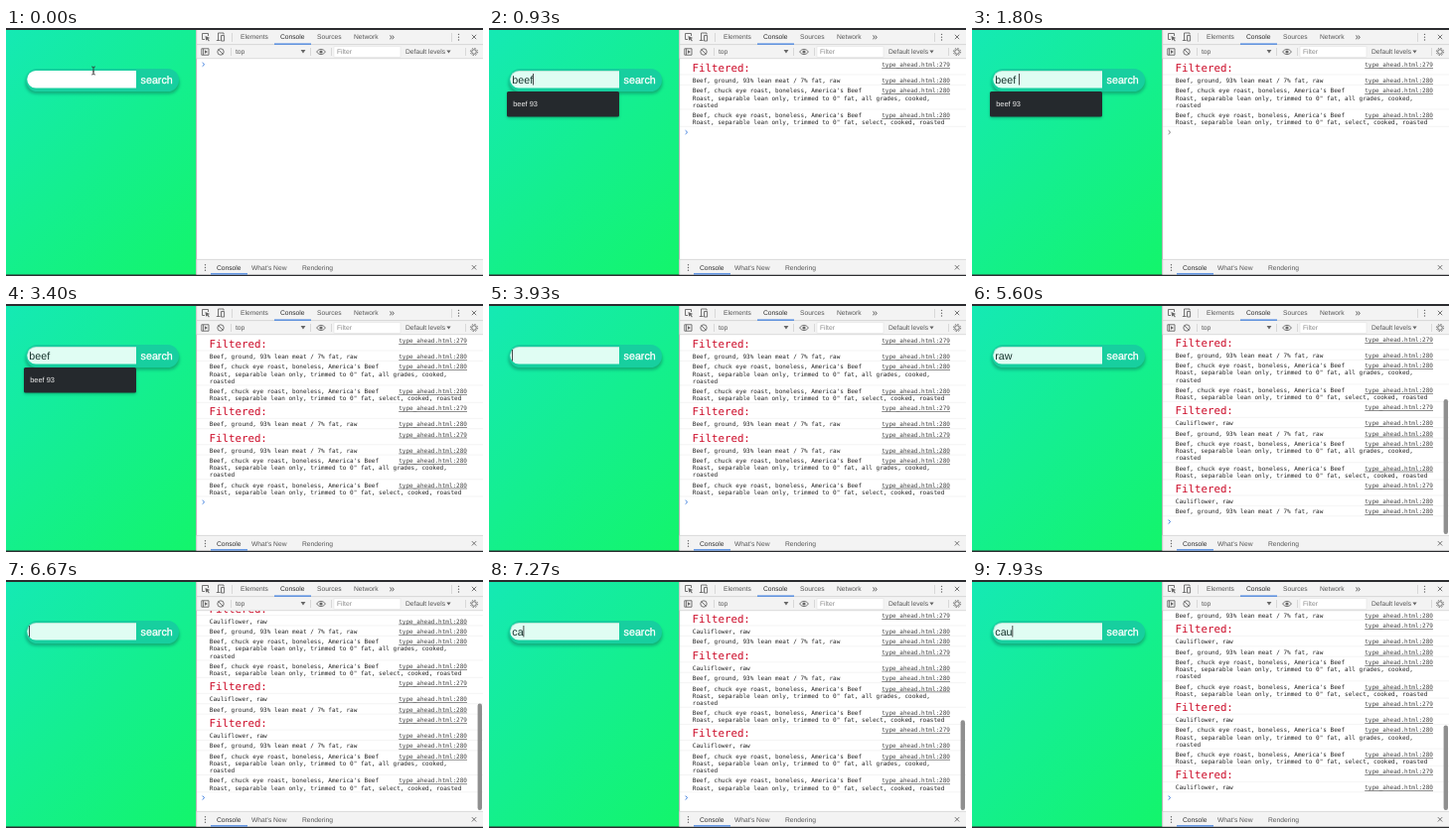
Write an HTML page that moves like this. It is 480 by 250 pixels and loops after 8000 ms.

```html
<!DOCTYPE html>
<html lang="en">
<head>
<meta charset="utf-8">
<title>Type ahead search</title>
<style>
  html, body { margin: 0; width: 100%; height: 100%; overflow: hidden; background: #2b2c2f; }
  svg { display: block; width: 480px; height: 250px; }
  text { text-rendering: geometricPrecision; white-space: pre; }
  .ui { font: 6.7px "Liberation Sans", Arial, sans-serif; fill: #555; }
  .ui .on { fill: #2a2a2a; }
  .mono { font: 6.03px "DejaVu Sans Mono", Menlo, monospace; fill: #222; }
  .link { text-decoration: underline; text-anchor: end; fill: #444; }
  .head { font-size: 10.75px; fill: #cc0a27; }
  .field { font: 10.7px "Liberation Sans", Arial, sans-serif; fill: #17332d; }
  .icon { fill: none; stroke: #666; stroke-width: .9; }
  .rule { fill: none; stroke: #ccc; stroke-width: .7; }
  .solid { fill: #666; }
</style>
</head>
<body>
<svg viewBox="0 0 480 250">
  <defs>
    <linearGradient id="bg" gradientUnits="userSpaceOnUse" x1="-14" y1="16" x2="205" y2="234">
      <stop offset="0" stop-color="#15e9b4"/>
      <stop offset="1" stop-color="#13f56b"/>
    </linearGradient>
    <filter id="soft" x="-20%" y="-60%" width="140%" height="240%">
      <feGaussianBlur stdDeviation="1.5"/>
    </filter>
    <clipPath id="view"><rect x="192" y="31" width="288" height="202"/></clipPath>
  </defs>

  <rect width="480" height="250" fill="#2b2c2f"/>
  <rect y="2" width="191" height="246.5" fill="url(#bg)"/>

  <!-- search box -->
  <rect x="19.5" y="44.5" width="155" height="22" rx="11" fill="#0a7f62" opacity=".55" filter="url(#soft)"/>
  <rect x="20" y="41" width="154" height="23" rx="11.5" fill="#17cf9f"/>
  <path id="box" d="M131 43H30a8.75 8.75 0 0 0 0 17.5H131z" fill="#fff"/>
  <path id="inset" d="M131 43.4H30a8.4 8.4 0 0 0-8.2 7" fill="none" stroke="#0a7f62" stroke-opacity=".25" stroke-width=".8"/>
  <text class="field" x="135.6" y="55.6" style="fill:#fff;stroke:#fff;stroke-width:.3">search</text>
  <text class="field" id="typed" x="23.3" y="55.6"></text>
  <rect id="caret" y="46" width=".8" height="11.5" fill="#222"/>
  <g id="menu">
    <rect x="18" y="65" width="113" height="26" rx="2" fill="#064" opacity=".4" filter="url(#soft)"/>
    <rect x="18" y="64" width="113" height="25.5" rx="1.5" fill="#25292d"/>
    <text x="24.2" y="79.4" style="font:7.4px 'Liberation Sans',Arial,sans-serif;fill:#f0f0f0">beef 93</text>
  </g>
  <path id="mouse" d="M-1.8-4Q0-4 0-2.8Q0-4 1.8-4M0-2.8V2.8M-1.8 4Q0 4 0 2.8Q0 4 1.8 4M-.9 1H.9" fill="none" stroke="#333" stroke-width=".9"/>

  <!-- console panel -->
  <rect x="191.5" y="2" width="288.5" height="246.5" fill="#fff"/>
  <g clip-path="url(#view)">
    <g id="log" class="mono"></g>
    <rect id="thumb" x="474.6" width="4.4" rx="2.2" fill="#8f8f8f"/>
  </g>

  <g class="ui">
    <path d="M191.5 2H480V30.5H191.5zM191.5 233.5H480V248.5H191.5z" fill="#f3f3f3"/>
    <path class="rule" d="M191.5 16.6H480M191.5 30.7H480M191.5 233.4H480M191.7 2V248.5M227.5 5V14M226.5 20V28M306.5 20V28M327.5 20V28M448.5 5V14M462.5 20V28"/>
    <path d="M270 16.1H307M206 247.9H243" stroke="#3b7de0" stroke-width="1.1"/>
    <rect x="330" y="18.8" width="67" height="10.4" fill="#fff" stroke="#ddd" stroke-width=".5"/>

    <text x="236" y="11.4">Elements</text>
    <text x="276" y="11.4" class="on">Console</text>
    <text x="313" y="11.4">Sources</text>
    <text x="350" y="11.4">Network</text>
    <text x="385.5" y="11.8" font-size="10">»</text>
    <text x="231" y="26.2">top</text>
    <text x="333" y="26.2" fill="#888">Filter</text>
    <text x="402" y="26.2">Default levels</text>
    <text x="212" y="243.6" class="on">Console</text>
    <text x="247" y="243.6">What's New</text>
    <text x="298" y="243.6">Rendering</text>

    <path class="icon" d="M203.5 8V5.5H197.5V11.5H200M213.5 12.5V5H219V6.5M216.5 7.5H219.6V13H216.5zM211.8 12.5H215.5"/>
    <path class="solid" d="M200.5 8L205.2 10L203.3 10.8L204.8 12.8L204 13.4L202.5 11.4L201.2 12.8z"/>
    <path class="icon" d="M196.8 20.8H204V27.2H196.8zM198.6 20.8V27.2"/>
    <path class="solid" d="M200 22.2L203 24L200 25.8zM296.6 22H301.4L299 25.6zM443.4 22.4H447.6L445.5 25.6z"/>
    <circle class="icon" cx="216" cy="24" r="3.2"/>
    <path class="icon" d="M213.8 21.8L218.2 26.2"/>
    <path class="icon" d="M312.5 24Q317 18.6 321.5 24Q317 29.4 312.5 24z"/>
    <circle class="solid" cx="317" cy="24" r="1.6"/>
    <circle class="icon" cx="471" cy="24" r="2.3" stroke-width="1.5"/>
    <circle class="icon" cx="471" cy="24" r="3.6" stroke-dasharray="1.4 1.427"/>
    <path class="icon" d="M468.8 6.8L473.2 11.2M473.2 6.8L468.8 11.2M468.8 239.1L473.2 243.5M473.2 239.1L468.8 243.5"/>
    <path d="M455.5 6V12.4M200.5 238.3V244.7" stroke="#666" stroke-width="1.4" stroke-linecap="round" stroke-dasharray="0 2.8" transform="translate(0 .4)"/>
  </g>
</svg>

<script>
const LOOP = 8000;
const TOP = 31, VIEW = 202, PROMPT_H = 19.2;
const $ = id => document.getElementById(id);

const chuck = "Beef, chuck eye roast, boneless, America's Beef";
const cut = 'Roast, separable lean only, trimmed to 0" fat, ';
const foods = {
  c: ["Cauliflower, raw"],
  g: ["Beef, ground, 93% lean meat / 7% fat, raw"],
  a: [chuck, cut + "all grades, cooked,", "roasted"],
  s: [chuck, cut + "select, cooked, roasted"]
};
const rowHeight = [0, 10.4, 17.3, 24.6];

// time and the foods that matched
const results = [
  [800, "gas"], [2330, "g"], [3130, "gas"], [4000, "cgas"],
  [5130, "cg"], [5730, "cgas"], [7070, "cas"], [7670, "c"]
];
// time and the text in the field
const keys = [
  [330, ""], [730, "b"], [800, "be"], [870, "bee"], [930, "beef"],
  [1800, "beef "], [2270, "beef 9"], [2670, "beef 93"], [2800, "beef 9"], [2870, "beef "],
  [3470, "bee"], [3530, "be"], [3600, "b"], [3670, ""],
  [4670, "r"], [4870, "ra"], [5070, "raw"], [5730, "ra"], [5930, "r"], [6200, ""],
  [7000, "c"], [7200, "ca"], [7600, "cau"]
];

function add(parent, tag, attrs, content = "") {
  const el = document.createElementNS("http://www.w3.org/2000/svg", tag);
  for (const name in attrs) el.setAttribute(name, attrs[name]);
  el.textContent = content;
  return parent.appendChild(el);
}

function addRow(group, y, height, line) {
  add(group, "text", { x: 464, y: y + 8, class: "link" }, "type_ahead.html:" + line);
  add(group, "path", { d: `M192 ${y + height}H480`, stroke: "#ececec", "stroke-width": .6 });
}

const log = $("log");
let end = TOP;
const ends = [end];
const groups = results.map(([, found]) => {
  const group = add(log, "g", {});
  add(group, "text", { x: 204.6, y: end + 13, class: "head" }, "Filtered:");
  addRow(group, end, 16, 279);
  end += 16;
  for (const id of found) {
    const lines = foods[id], height = rowHeight[lines.length];
    lines.forEach((s, i) => add(group, "text", { x: 204.8, y: end + 8 + i * 7.1 }, s));
    addRow(group, end, height, 280);
    end += height;
  }
  ends.push(end);
  return group;
});
const prompt = add(log, "path", { d: "M197.6 3.9L199.6 5.8L197.6 7.7", fill: "none", "stroke-width": 1 });

const show = (el, on) => el.style.display = on ? "" : "none";

function drawLog(t) {
  const count = results.filter(r => r[0] <= t).length;
  groups.forEach((g, i) => show(g, i < count));
  const total = ends[count] - TOP + PROMPT_H;
  const scroll = Math.max(0, total - VIEW);
  log.setAttribute("transform", `translate(0 ${-scroll})`);
  prompt.setAttribute("transform", `translate(0 ${ends[count]})`);
  prompt.setAttribute("stroke", t >= 1270 && t < 3130 ? "#777" : "#3f7fe0");
  const size = VIEW * VIEW / total;
  show($("thumb"), scroll > 0);
  $("thumb").setAttribute("y", TOP + VIEW - size);
  $("thumb").setAttribute("height", size - 1);
}

function drawField(t) {
  const [since, text] = keys.filter(k => k[0] <= t).pop() || [0, ""];
  const focused = t >= keys[0][0];
  $("typed").textContent = text;
  $("box").setAttribute("fill", focused ? "#e0fdf3" : "#fff");
  show($("inset"), focused);
  show($("caret"), focused && (t - since) % 1000 < 500);
  $("caret").setAttribute("x", 23.2 + (text ? $("typed").getComputedTextLength() : 0));
  show($("menu"), t >= 730 && t < 3670);
}

function drawMouse(t) {
  const p = Math.min(1, Math.max(0, (t - 70) / 260));
  const ease = p * p * (3 - 2 * p);
  $("mouse").setAttribute("transform", `translate(${88 - 8 * ease} ${43 + 9 * ease})`);
  show($("mouse"), t < 730);
}

const start = performance.now();
function frame() {
  const t = (performance.now() - start) % LOOP;
  drawLog(t);
  drawField(t);
  drawMouse(t);
  requestAnimationFrame(frame);
}
frame();
</script>
</body>
</html>
```
